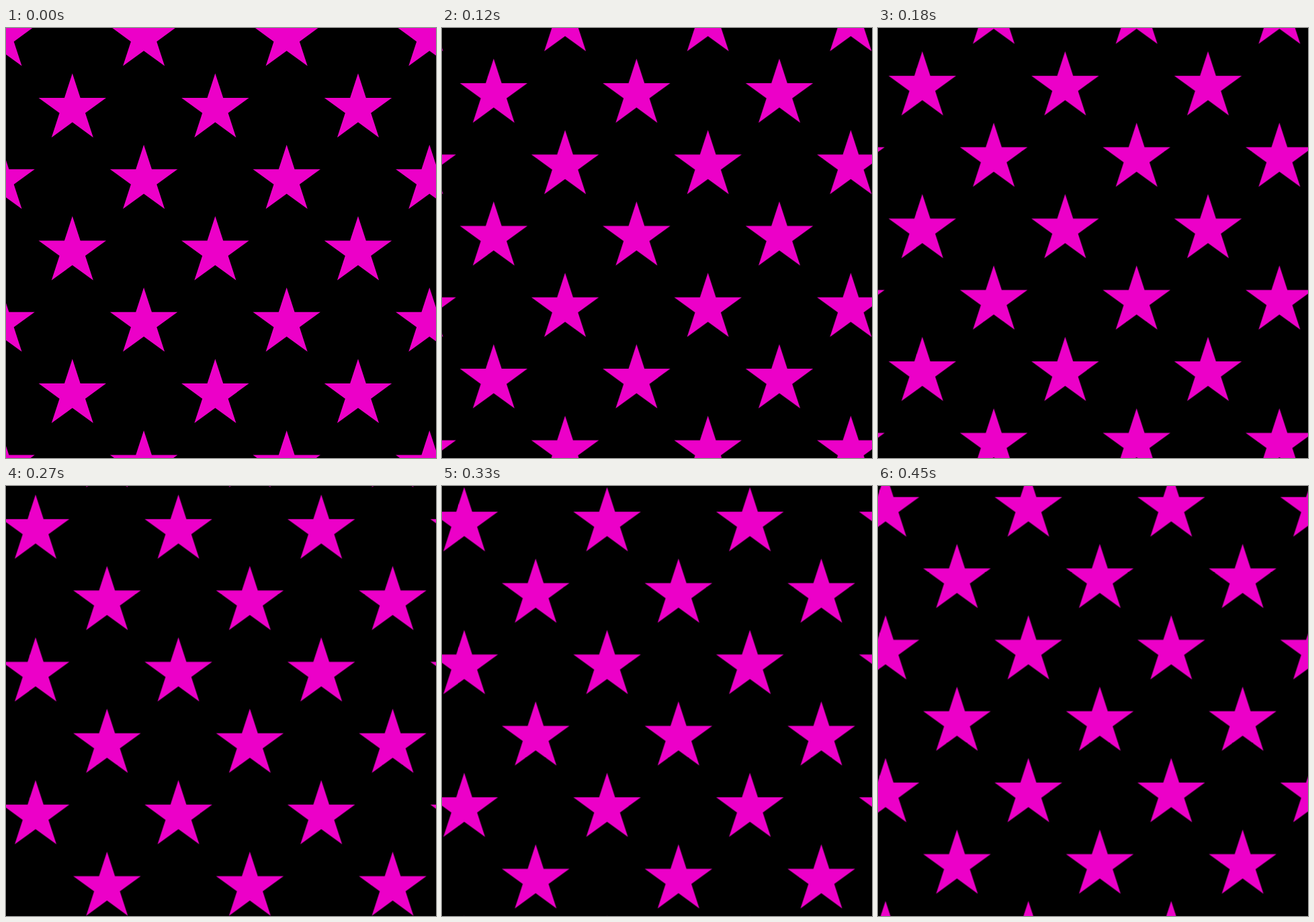
Write an HTML page that moves like this. It is 640x640 px and loops after 0.51 s.

```html
<!DOCTYPE html>
<html lang="en">
<head>
<meta charset="utf-8">
<title>Drifting stars</title>
<style>
  html, body { margin: 0; width: 100%; height: 100%; overflow: hidden; background: #000; }
  svg { display: block; width: 100%; height: 100%; }
</style>
</head>
<body>
<svg viewBox="0 0 640 640"><path id="stars" fill="#ec00c8"/></svg>
<script>
  const LOOP = 510;
  const STEP = 10.95;
  const STARTS = [0, 60, 120, 180, 210, 270, 330, 390, 450];
  const SPACING = 106.3;
  const RADIUS = 52.8;
  const INNER = RADIUS * 0.382;
  const ORIGIN = { x: 98.8, y: 120.2 };

  function star(cx, cy) {
    const points = Array.from({ length: 10 }, (_, i) => {
      const r = i % 2 ? INNER : RADIUS;
      const a = i * Math.PI / 5;
      return `${(cx + r * Math.sin(a)).toFixed(2)} ${(cy - r * Math.cos(a)).toFixed(2)}`;
    });
    return `M${points.join('L')}Z`;
  }

  // Checkerboard lattice, large enough to cover the stage through the whole drift.
  let outline = '';
  for (let row = -1; row <= 7; row++) {
    for (let col = -2; col <= 7; col++) {
      if ((row + col) % 2 === 0) {
        outline += star(ORIGIN.x + col * SPACING, ORIGIN.y + row * SPACING);
      }
    }
  }

  const stars = document.getElementById('stars');
  stars.setAttribute('d', outline);

  const shift = i => `translate(${-i * STEP}px, ${-i * STEP}px)`;
  const frames = STARTS.map((t, i) => ({
    offset: t / LOOP, transform: shift(i), easing: 'steps(1, end)'
  }));
  frames.push({ offset: 1, transform: shift(STARTS.length - 1) });
  stars.animate(frames, { duration: LOOP, iterations: Infinity });
</script>
</body>
</html>
```
